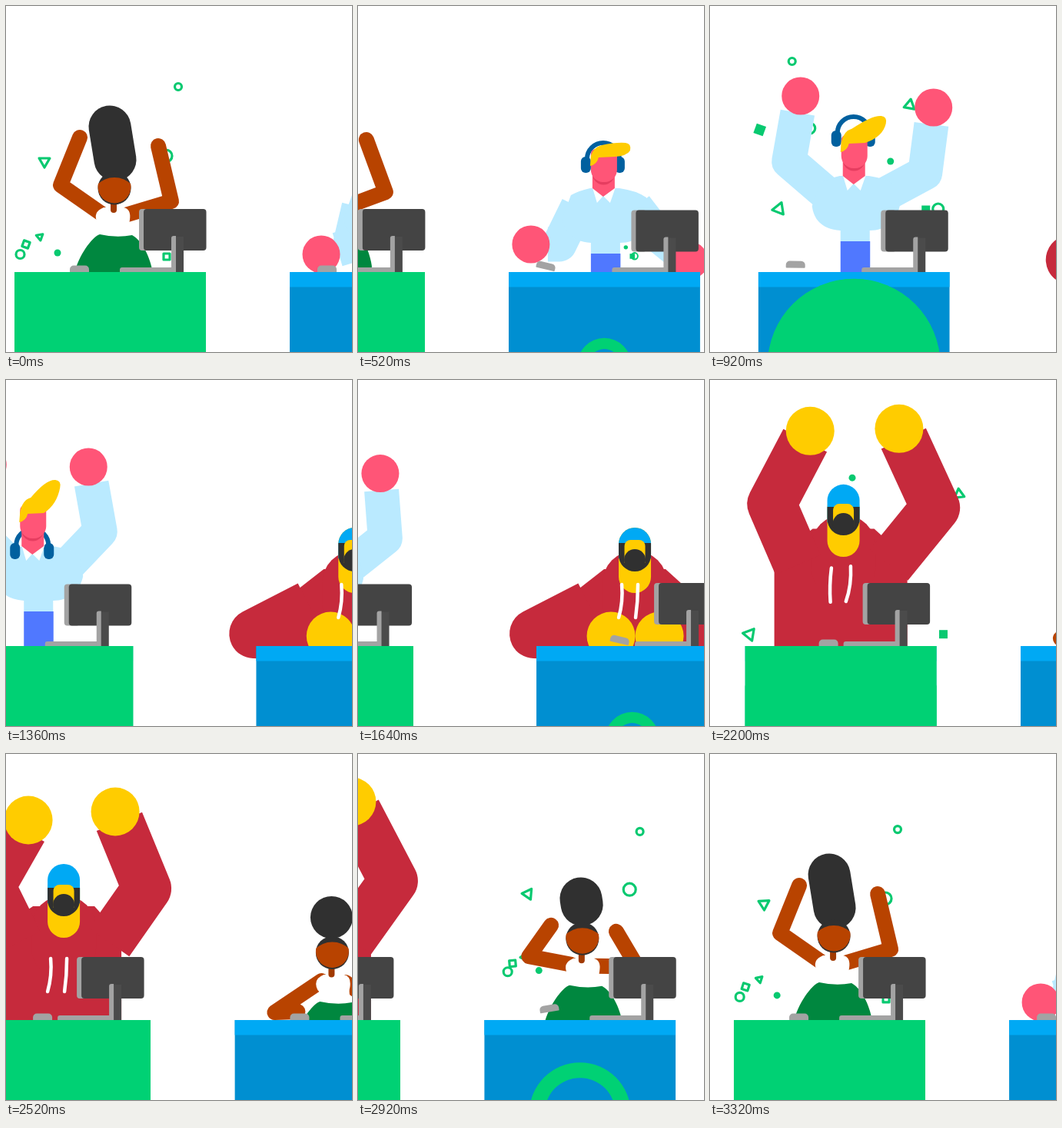
An HTML page with a canvas that plays this animation: 450 px wide and 450 px high, repeating every 3360 ms.

```html
<!DOCTYPE html>
<html>
<head>
<meta charset="utf-8">
<style>
html, body { margin: 0; width: 100%; height: 100%; overflow: hidden; background: #fff; }
canvas { display: block; width: 450px; height: 450px; }
</style>
</head>
<body>
<canvas id="stage" width="450" height="450"></canvas>
<script>
const c = document.getElementById('stage').getContext('2d');
const LOOP = 3360, STEP = 1120, SPEED = 0.3329, SPAN = 1125.3;
const DESK_X = [11, 369, 778];
const GREEN = '#00d174', CONFETTI = '#08c970', GRAY = '#a3a3a3', DARK = '#444';
const SKIN = '#b84300', HAIR = '#303030', PINK = '#ff5577', SHIRT = '#baeaff';
const NAVY = '#00609f', YELLOW = '#ffcc00', RED = '#c62a3c', SKY = '#00a9f4';

function fill(color) { c.fillStyle = color; c.fill(); }
function stroke(color, w, cap = 'butt') {
  c.strokeStyle = color; c.lineWidth = w; c.lineCap = cap; c.lineJoin = 'round'; c.stroke();
}
function disc(x, y, r, color) { c.beginPath(); c.arc(x, y, r, 0, 7); fill(color); }
function box(x, y, w, h, color, r = 0) { c.beginPath(); c.roundRect(x, y, w, h, r); fill(color); }
function poly(pts, color) {
  c.beginPath();
  for (let i = 0; i < pts.length; i += 2) c.lineTo(pts[i], pts[i + 1]);
  c.closePath();
  fill(color);
}
const mix = (a, b, k) => a + (b - a) * k;

// Eased pose between rows of [time, ...values]
function pose(rows, t) {
  if (t <= rows[0][0]) return rows[0].slice(1);
  for (let i = 1; i < rows.length; i++) {
    const a = rows[i - 1], b = rows[i];
    if (t < b[0]) {
      const k = (t - a[0]) / (b[0] - a[0]), e = k * k * (3 - 2 * k);
      return a.slice(1).map((v, j) => mix(v, b[j + 1], e));
    }
  }
  return rows[rows.length - 1].slice(1);
}

function limb(sx, sy, ex, ey, hx, hy, w, color, cap, trim = 0) {
  const k = 1 - trim / Math.max(trim + 1, Math.hypot(hx - ex, hy - ey));
  c.beginPath();
  c.moveTo(sx, sy);
  c.lineTo(ex, ey);
  c.lineTo(mix(ex, hx, k), mix(ey, hy, k));
  stroke(color, w, cap);
}

// Woman: body drop, left hand, left elbow, right hand, right elbow, head x, bun stretch
const WOMAN = [
  [520, 25, 82, 335, 52, 336, 165, 337, 200, 336, 127, 0],
  [800, -10, 90, 150, 62, 216, 176, 162, 198, 238, 128, 0.3],
  [1080, 0, 85, 171, 60, 233, 187, 182, 204, 254, 130, 1],
  [1120, 0, 85, 171, 60, 233, 187, 182, 204, 254, 130, 1],
  [1640, -10, 72, 165, 52, 226, 173, 174, 198, 242, 127, 0.3]
];
function woman(t) {
  const [dy, lx, ly, px, py, rx, ry, qx, qy, hx, bun] = pose(WOMAN, t);
  const hy = 237 + dy * 0.86;
  limb(113, 270 + dy, px, py, lx, ly, 20, SKIN, 'round');
  limb(144, 272 + dy, qx, qy, rx, ry, 20, SKIN, 'round');
  c.save();
  c.translate(0, dy);
  c.beginPath();
  c.moveTo(116, 262);
  c.quadraticCurveTo(101, 268, 108, 282);
  c.quadraticCurveTo(115, 288, 111, 301);
  c.lineTo(155, 301);
  c.quadraticCurveTo(147, 288, 150, 278);
  c.quadraticCurveTo(152, 264, 142, 262);
  fill('#fff');
  c.beginPath();
  c.moveTo(78, 348);
  c.bezierCurveTo(83, 325, 101, 300, 111, 297);
  c.quadraticCurveTo(133, 302, 153, 298);
  c.bezierCurveTo(168, 306, 178, 332, 180, 348);
  c.lineTo(180, 390);
  c.lineTo(78, 390);
  fill('#00873f');
  c.restore();
  c.beginPath();
  c.moveTo(hx - 1, hy + 15);
  c.lineTo(hx - 1, hy + 28);
  stroke('#a13a00', 8, 'round');
  c.beginPath();
  c.moveTo(hx + mix(-1, 1, bun), hy + mix(-46, -37, bun));
  c.lineTo(hx + mix(-1, -6, bun), hy + mix(-46.1, -80, bun));
  stroke(HAIR, 55, 'round');
  disc(hx, hy, 21.5, HAIR);
  c.save();
  c.beginPath();
  c.arc(hx, hy + 18, 32, 0, 7);
  c.clip();
  disc(hx, hy - 2, 21.5, SKIN);
  c.restore();
}

// Man: hip y, head, left hand, left elbow, right hand, right elbow, headset drop, quiff tip
const MAN = [
  [430, 322, 124, 210, 41, 323, 78, 312, 235, 328, 192, 296, -4, 34, -25],
  [520, 322, 124, 210, 29, 310, 66, 310, 235, 331, 192, 296, -4, 34, -25],
  [800, 302, 125, 187, 52, 114, 36, 198, 232, 128, 221, 213, -24, 40, -33],
  [920, 306, 125, 192, 55, 117, 40, 202, 228, 132, 217, 217, -20, 41, -42],
  [1360, 301, 119, 187, 60, 110, 44, 195, 191, 113, 206, 197, 35, 35, -50],
  [1760, 305, 124, 191, 54, 117, 40, 202, 210, 124, 214, 208, 35, 37, -42]
];
function man(t) {
  const [by, hx, hy, lx, ly, px, py, rx, ry, qx, qy, hp, tx, ty] = pose(MAN, t);
  box(107, by, 38.5, 60, '#5078ff');
  limb(90, by - 61, px, py, lx, ly, 45, SHIRT, 'butt', 22);
  limb(165, by - 61, qx, qy, rx, ry, 45, SHIRT, 'butt', 22);
  c.save();
  c.translate(126, by);
  c.beginPath();
  c.moveTo(-19, 0);
  c.lineTo(-19, -14);
  c.bezierCurveTo(-45, -16, -54, -30, -56, -46);
  c.lineTo(-45, -76);
  c.quadraticCurveTo(-34, -82, -20, -85);
  c.lineTo(18, -85);
  c.quadraticCurveTo(40, -82, 53, -73);
  c.lineTo(58, -46);
  c.bezierCurveTo(54, -26, 40, -14, 19, -14);
  c.lineTo(19, 0);
  fill(SHIRT);
  c.restore();
  disc(lx, ly, 24.5, PINK);
  disc(rx, ry, 24.5, PINK);

  c.beginPath();
  c.arc(hx - 1, hy + hp - 7, 21, Math.PI, 0);
  stroke(NAVY, 6);
  box(hx - 30, hy + hp - 10, 13, 21, NAVY, 6);
  box(hx + 14, hy + hp - 10, 13, 21, NAVY, 6);

  poly([hx - 15, by - 86, hx - 9, by - 66, hx - 1, by - 75, hx + 8, by - 66, hx + 15, by - 86], '#fff');
  poly([hx - 15, hy, hx + 14, hy, hx + 14, by - 85, hx - 1, by - 74, hx - 15, by - 85], PINK);
  c.beginPath();
  c.arc(hx - 0.5, hy + 8, 14.5, 0, Math.PI);
  c.lineTo(hx - 15, hy);
  c.lineTo(hx + 14, hy);
  fill('#e63d60');
  box(hx - 17, hy - 24, 34, 43, PINK, [6, 6, 16, 16]);

  const lift = (-25 - ty) / 25;
  c.save();
  c.translate(hx, hy);
  c.beginPath();
  c.moveTo(-18, -2);
  c.lineTo(-17, -15);
  c.quadraticCurveTo(-14, -26 - 5 * lift, -3, -29 - 5 * lift);
  c.quadraticCurveTo(tx - 18, ty - 8, tx - 6, ty - 7);
  c.quadraticCurveTo(tx + 2, ty - 6, tx, ty + 3);
  c.quadraticCurveTo(tx - 4, mix(-15, -25, lift), 14, -14);
  c.lineTo(-7, -13);
  c.quadraticCurveTo(-9, -4, -18, -2);
  fill(YELLOW);
  c.restore();
}

// Big guy: head x, head top, shoulder y, hands and elbows, string flight, cap lift
const GUY = [
  [520, 128, 192, 293, 97, 333, -3, 330, 160, 333, 258, 330, 0, 0],
  [760, 123, 157, 250, 62, 141, -9, 213, 191, 157, 278, 220, 1, 0],
  [1000, 127, 144, 240, 84, 64, 34, 160, 200, 62, 248, 165, 0.5, 9],
  [1400, 136, 154, 245, 90, 86, 41, 172, 203, 75, 244, 175, 0, 11],
  [1740, 126, 148, 242, 66, 80, 14, 168, 186, 62, 240, 165, 0.4, 4]
];
function guy(t) {
  const [hx, top, sy, lx, ly, px, py, rx, ry, qx, qy, fly, lift] = pose(GUY, t);
  poly([38, 400, 38, sy - 8, hx - 40, sy - 47, hx + 40, sy - 47, 211, sy - 8, 211, 400], RED);
  box(hx - 42, top + 30, 84, 110, RED, 42);
  limb(hx - 59, sy, px, py, lx, ly, 64, RED, 'butt', 14);
  limb(hx + 59, sy, qx, qy, rx, ry, 64, RED, 'butt', 14);
  disc(lx, ly, 31.5, YELLOW);
  disc(rx, ry, 31.5, YELLOW);

  box(hx - 21, top, 42, 85, YELLOW, 21);
  box(hx - 21, top - lift, 42, 40 + lift, SKY, [21, 21, 0, 0]);
  box(hx - 21, top + 20, 42, 37, HAIR, [0, 0, 21, 21]);
  box(hx - 13.5, top + 16, 27, 30, YELLOW, [8, 8, 0, 0]);
  disc(hx, top + 42, 14, HAIR);

  const str = (x0, y0, x1, y1, x2, y2, u0, v0, u1, v1, u2, v2) => {
    c.beginPath();
    c.moveTo(hx + mix(x0, u0, fly), mix(y0, v0, fly));
    c.quadraticCurveTo(hx + mix(x1, u1, fly), mix(y1, v1, fly), hx + mix(x2, u2, fly), mix(y2, v2, fly));
    stroke('#fff', 4.5, 'round');
  };
  str(-17, 266, -15, 288, -21, 309, -14, 218, -23, 243, -12, 264);
  str(4, 266, 4, 288, 1, 309, 16, 213, 19, 240, 6, 262);
}

// Confetti: [shape, x, y, size, turn] at the given age
const BITS = [
  { age: 620, list: [['ring', 213, 105, 4.5, 0], ['tri', 39, 202, 8, 1.57], ['ring', 197, 195, 8, 0],
    ['tri', 33, 300, 5, -0.7], ['sq', 15, 310, 4, 0.35], ['ring', 7.5, 323, 5.5, 0],
    ['dot', 56, 321, 4.5, 0], ['sq', 198, 326, 4, 0]] },
  { age: 420, list: [['ring', 44, 72, 4.5, 0], ['box', 2, 161, 6.5, 0.35], ['ring', 67, 159, 7, 0],
    ['tri', 197, 129, 8, 2.8], ['dot', 172, 202, 4.5, 0], ['tri', 27, 264, 9, -1.2],
    ['box', 218, 265, 5.5, 0], ['ring', 234, 264, 7, 0]] },
  { age: 260, list: [['ring', 68, 90, 9.5, 0], ['ring', 34, 110, 5, 0], ['dot', 140, 106, 4.5, 0],
    ['tri', 269, 126, 7.5, 0.1], ['sq', 67, 207, 4, 0.35], ['tri', 16, 295, 9, -1.2],
    ['box', 250, 295, 5.5, 0]] }
];
function confetti(kind, t) {
  const u = t - 500, { age, list } = BITS[kind];
  if (u <= 0 || u > 780) return;
  const grow = Math.min(1, 0.4 + u / 100, (780 - u) / 140);
  const burst = (1 - Math.exp(-u / 100)) / (1 - Math.exp(-age / 100));
  const ox = 148, oy = 345, G = 0.00015;
  for (const [shape, x, y, s, turn] of list) {
    c.save();
    c.translate(ox + (x - ox) * burst, oy + (y - oy - G * age * age) * burst + G * u * u);
    c.rotate(turn + (turn && (u - age) * 0.001));
    c.scale(grow, grow);
    c.beginPath();
    if (shape === 'ring' || shape === 'dot') c.arc(0, 0, s, 0, 7);
    else if (shape === 'tri') {
      for (let i = 0; i < 3; i++) c.lineTo(s * Math.cos(i * 2.0944), s * Math.sin(i * 2.0944));
      c.closePath();
    } else c.rect(-s, -s, 2 * s, 2 * s);
    if (shape === 'dot' || shape === 'box') fill(CONFETTI);
    else stroke(CONFETTI, 3.2);
    c.restore();
  }
}

function desk(t) {
  c.save();
  c.beginPath();
  c.rect(0, 346, 249, 104);
  c.clip();
  box(0, 346, 249, 104, '#008fd1');
  box(0, 346, 249, 19.5, SKY);
  const ring = (r, color) => r > 0 && disc(124.5, 467, r, color);
  ring((t - 337) * 0.192, GREEN);
  if (t < 920) ring((t - 386) * 0.156, '#008fd1');
  ring((t - 701) * 0.513, GREEN);
  c.restore();
}

const MOUSE_X = [84.5, 48.5, 108.5], SCREEN = [[0, 0], [-2.5, 1.5], [-9, 0]];
function mouse(kind, t) {
  const p = (t - 470) / 530, on = p > 0 && p < 1;
  c.save();
  c.translate(MOUSE_X[kind], 342 - (on ? 46 * p * (1 - p) : 0));
  if (on) c.rotate(0.27 * Math.cos(p * 5.6));
  box(-12.5, -4.5, 25, 9, GRAY, [5, 5, 1, 1]);
  c.restore();
}
function screen(kind) {
  const [dx, dy] = SCREEN[kind];
  box(137 + dx, 340, 73, 6, GRAY, [3, 0, 0, 0]);
  box(162 + dx, 264 + dy, 20, 54, GRAY, 4);
  box(168 + dx, 264 + dy, 81.5, 54, DARK, 4);
  box(209 + dx, 300 + dy, 11, 46 - dy, '#4b4b4b');
  box(204 + dx, 299 + dy, 6, 47 - dy, GRAY, [3, 0, 0, 0]);
}

const PEOPLE = [woman, man, guy];
function draw(t) {
  c.fillStyle = '#fff';
  c.fillRect(0, 0, 450, 450);
  for (let i = 0; i < 5; i++) {
    const kind = i % 3;
    const x = DESK_X[kind] + Math.floor(i / 3) * SPAN - SPEED * t;
    if (x < -340 || x > 520) continue;
    const own = t + STEP - i * STEP;
    c.save();
    c.translate(x, 0);
    confetti(kind, own);
    if (kind === 2) mouse(kind, own < 480 ? 0 : -1);
    PEOPLE[kind](own);
    if (kind !== 2 || own > 480) mouse(kind, own);
    desk(own);
    screen(kind);
    c.restore();
  }
}

const start = performance.now();
function tick() {
  const t = (performance.now() - start) % LOOP;
  draw(Math.floor(t / 40) * 40);
  requestAnimationFrame(tick);
}
tick();
</script>
</body>
</html>
```
